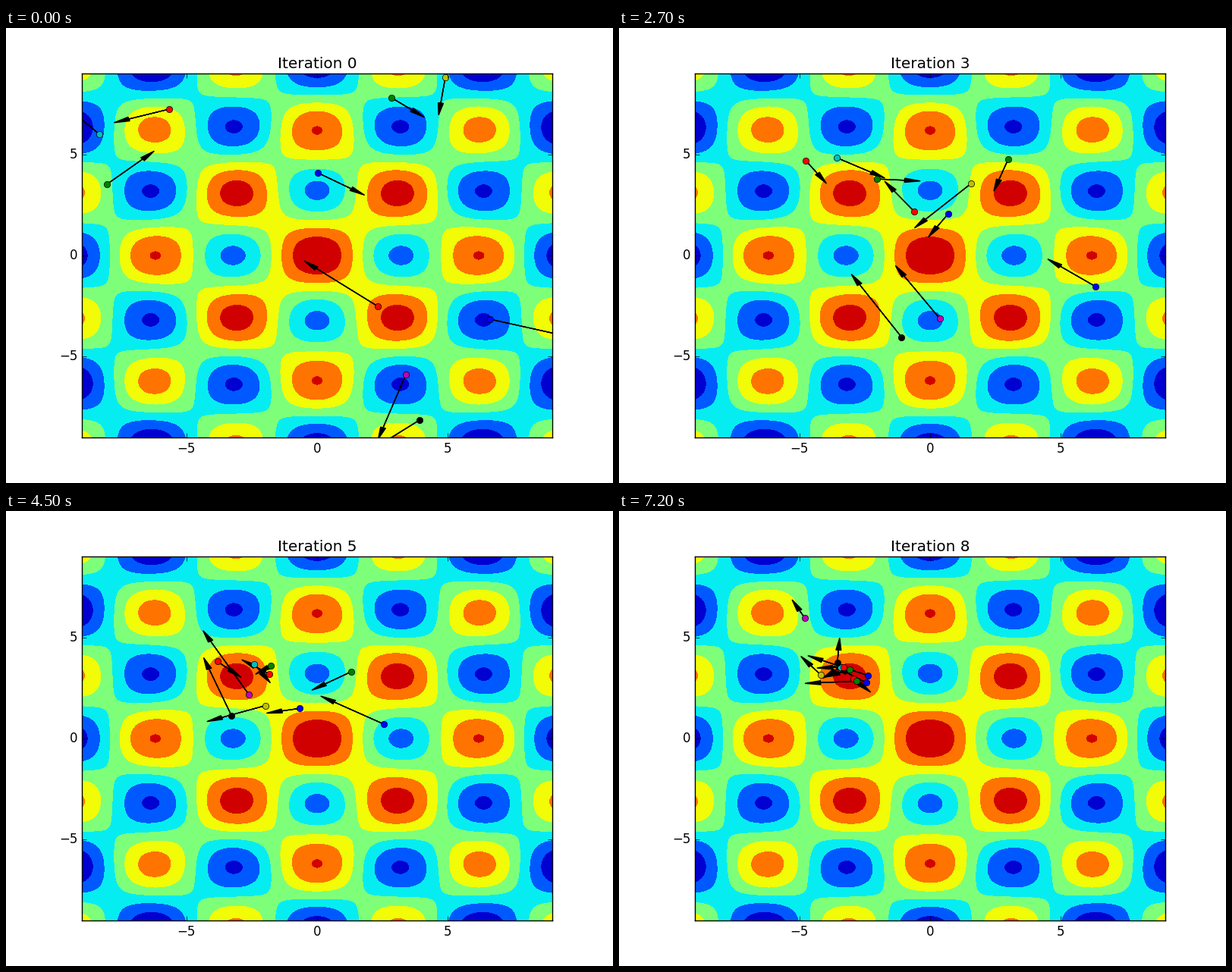
Recreate the animation shown at these times as a matplotlib script. Size 800x600 px, loop 8000 ms.

```python
import numpy as np
import matplotlib.pyplot as plt
from matplotlib.animation import FuncAnimation

plt.style.use("classic")
plt.rcParams.update({"font.family": "DejaVu Sans", "figure.facecolor": "white"})

INTERVAL = 100       # ms per animation frame
FRAMES = 80
STEP_MS = 900        # ms per swarm iteration
LIMIT = 9

KEYS = (0, 1, 4, 6)              # iterations of each particle's key points
LAST = 8
BEST = np.array([304, 218])      # where the swarm gathers, in stage pixels
INERTIA, PULL = 0.7, 0.2
UNIT = np.array([18 / 620, -18 / 480])   # stage pixels to axes units
ORIGIN = np.array([410, 300])

fig = plt.figure(figsize=(8, 6), dpi=100)
ax = fig.add_axes([0.125, 0.1, 0.775, 0.8])
ax.set_xlim(-LIMIT, LIMIT)
ax.set_ylim(-LIMIT, LIMIT)
ax.set_xticks([-5, 0, 5])
ax.set_yticks([-5, 0, 5])
title = ax.set_title("Iteration 0")


def fitness(x, y):
    return np.cos(x) * np.cos(y) + np.exp(-(x**2 + y**2) / 81)


grid = np.linspace(-LIMIT, LIMIT, 271)
X, Y = np.meshgrid(grid, grid)
ax.contourf(X, Y, fitness(X, Y), levels=np.linspace(-0.8, 2, 8), cmap="jet")


def swarm_path(points):
    """A cubic through the key points, then damped steps towards the best spot."""
    cubic = np.polyfit(KEYS, points, 3)
    path = [np.polyval(cubic[:, None, :], k)[0] if cubic.ndim == 3 else
            sum(c * k ** (3 - i) for i, c in enumerate(cubic))
            for k in range(KEYS[-1] + 1)]
    while len(path) <= LAST:
        step = INERTIA * (path[-1] - path[-2]) + PULL * (BEST - path[-1])
        path.append(path[-1] + step)
    return np.array(path)


class Particle:
    def __init__(self, color, push, *points):
        path = swarm_path(points)
        self.pos = (path - ORIGIN) * UNIT
        self.vel = np.vstack([push, np.diff(path, axis=0)]) * UNIT
        self.arrow = ax.arrow(*self.pos[0], *self.vel[0], head_width=0.2,
                              head_length=0.6, fc="k", ec="k", lw=1)
        self.dot, = ax.plot([], [], "o", color=color, ms=6, mec="k", mew=0.5)

    def show(self, k):
        (x, y), (dx, dy) = self.pos[k], self.vel[k]
        self.arrow.set_data(x=x, y=y, dx=dx, dy=dy)
        self.dot.set_data([x], [y])


# colour, first velocity, key points
swarm = [
    Particle("b", (44, 21), (411, 191), (444, 209), (410, 257), (374, 252)),
    Particle("g", (47, -33), (133, 206), (236, 199), (353, 202), (335, 203)),
    Particle("r", (-53, 13), (215, 107), (219, 135), (263, 188), (290, 207)),
    Particle("c", (-46, -38), (123, 140), (185, 139), (317, 190), (312, 199)),
    Particle("m", (-30, 70), (527, 457), (507, 469), (371, 313), (277, 185)),
    Particle("y", (-6, 34), (579, 65), (567, 108), (399, 241), (305, 243)),
    Particle("k", (-74, 46), (545, 517), (487, 520), (327, 332), (289, 242)),
    Particle("b", (90, 20), (638, 384), (684, 384), (563, 310), (451, 260)),
    Particle("g", (27, 16), (508, 92), (524, 118), (489, 196), (412, 218)),
    Particle("r", (-81, -50), (490, 367), (448, 309), (367, 225), (328, 208)),
]


def update(frame):
    k = frame * INTERVAL // STEP_MS
    title.set_text(f"Iteration {k}")
    for particle in swarm:
        particle.show(k)


anim = FuncAnimation(fig, update, frames=FRAMES, interval=INTERVAL,
                     init_func=lambda: update(0), repeat=True, blit=False)
plt.show()
```
